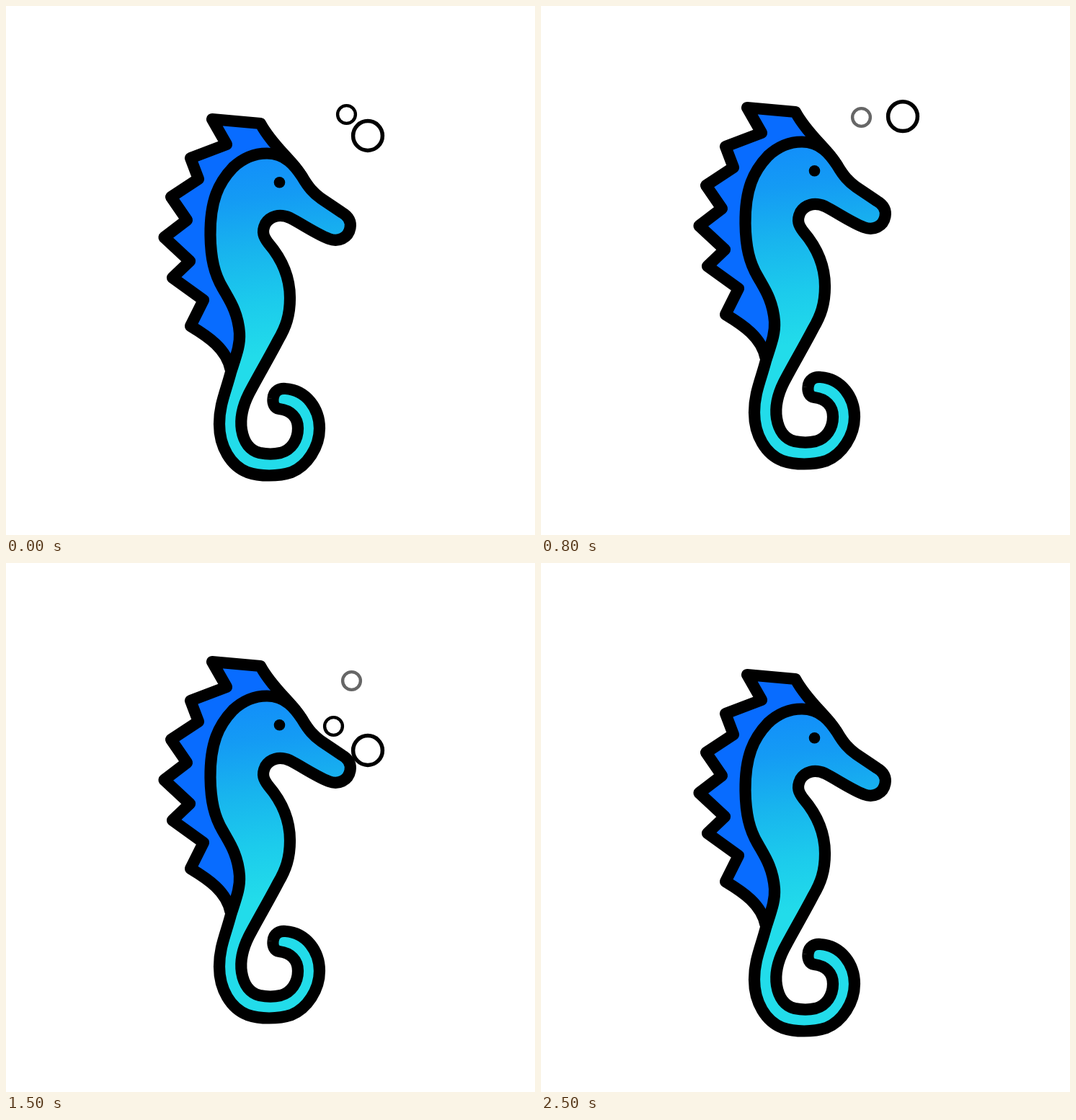
An HTML page with a canvas for the animation above (2.6 s loop, 734 by 734 pixels).

```html
<!DOCTYPE html>
<html lang="en">
<head>
<meta charset="utf-8">
<title>Seahorse</title>
<style>
  html, body { margin: 0; width: 100%; height: 100%; overflow: hidden; background: #fff; }
  canvas { display: block; }
</style>
</head>
<body>
<canvas id="stage" width="734" height="734"></canvas>
<script>
const ctx = document.getElementById('stage').getContext('2d');
const SIZE = 734, STEP = 100, STEPS = 26;

const finEdge = `M411 237 C407 231 403 225 398 219.5 C385 204 366 187 353 163
  L286 157 L306 192 L256 211 L267 240 L229 265 L251 297 L219.5 321 L255 354
  L231 377 L274 408 L256 444 C281 459 306 476 311.5 504`;
const fin = new Path2D(finEdge);
// The fill closes underneath the body.
const finFill = new Path2D(finEdge + 'L324 454 L305 390 L288 320 L320 228 L362 208 Z');

const body = new Path2D(`M362 204.5 C388 204.5 401 222 411 237 C420 252 426 259 437 267
  L466 286.5 C476 292 479 300 477.5 308 C475 322 461 328 448 323
  C430 316 410 302 394 294 C379 287.5 366 292 360 302 C354 314 358 321 364 329
  C382 350 394 374 394 405 C394 430 388 446 378 463 C365 488 349 515 337 538
  C327 558 325 575 327 588 C330 606 339 617 352 620 C362 622 372 622 381 620
  C396 616 405 602 405 586 C405 571 395 561 379 559 C372 558 370 551 370.5 545
  C371 534 380 530 388 531 C417 533 435 559 435 586 C435 612 418 638 396 647
  C378 653 352 653 335 647 C312 638 296 612 296 580 C296 553 305 535 312 508
  C320 483 325 470 324 454 C322 425 310 408 301 392 C289 372 284 350 283.5 318
  C283 270 295 245 315 224 C330 210 346 204.5 362 204.5 Z`);

const skin = ctx.createLinearGradient(335, 212, 365, 485);
[[0, '#128ffa'], [0.2, '#149bf4'], [0.46, '#18b4ee'], [0.73, '#1ccbec'], [1, '#22dcea']]
  .forEach(([at, color]) => skin.addColorStop(at, color));

// Vertical drift as [step, offset] pairs.
const drift = [[0, 0], [12, -24], [13, -24], [15, -20], [18, -16], [26, 0]];

// Bubbles drift at `slow` px per step, then rise quickly from step `fast` and fade after `fade`.
const small = { r: 12.4, w: 4.4, slow: 2 };
const big = { r: 20.4, w: 5.5, slow: 2 };
const bubbles = [
  { ...small, x: 472.5, y: 150.5, start: 0, fast: 0, fade: 3 },
  { ...small, x: 444.5, y: 204.5, start: 3, fast: 3, fade: 6 },
  { ...small, x: 479.5, y: 213.5, start: 10, fast: 10, fade: 13 },
  { ...small, x: 454.5, y: 234.5, start: 11, fast: 15, fade: 16 },
  { ...big, x: 502, y: 180, start: 0, fast: 7, fade: 8, slow: 2.4 },
  { ...big, x: 502, y: 262, start: 14, fast: 19, fade: 19 }
];

function offsetAt(n) {
  const i = drift.findIndex(([step]) => step > n);
  const [n0, y0] = drift[i - 1], [n1, y1] = drift[i];
  return y0 + (y1 - y0) * (n - n0) / (n1 - n0);
}

function disc(x, y, r) {
  ctx.beginPath();
  ctx.arc(x, y, r, 0, Math.PI * 2);
}

function outlined(edge, area, fill) {
  ctx.fillStyle = fill;
  ctx.lineWidth = 16.2;
  ctx.fill(area);
  ctx.stroke(edge);
}

function drawSeahorse(dy) {
  ctx.save();
  ctx.translate(0, dy);
  outlined(fin, finFill, '#086cff');
  outlined(body, body, skin);
  ctx.fillStyle = '#000';
  disc(379.5, 244.8, 7.8);
  ctx.fill();
  ctx.restore();
}

function drawBubble(b, n) {
  const alpha = 1 - 0.2 * Math.max(0, n - b.fade);
  if (n < b.start || alpha < 0.01) return;
  const rise = b.slow * (Math.min(n, b.fast) - b.start) + 10 * Math.max(0, n - b.fast);
  ctx.globalAlpha = alpha;
  ctx.lineWidth = b.w;
  disc(b.x, b.y - rise, b.r);
  ctx.stroke();
  ctx.globalAlpha = 1;
}

function draw(time) {
  const n = Math.floor(time / STEP) % STEPS;
  ctx.fillStyle = '#fff';
  ctx.fillRect(0, 0, SIZE, SIZE);
  ctx.strokeStyle = '#000';
  ctx.lineJoin = ctx.lineCap = 'round';
  drawSeahorse(offsetAt(n));
  bubbles.forEach(b => drawBubble(b, n));
}

const began = performance.now();
function tick() {
  draw(performance.now() - began);
  requestAnimationFrame(tick);
}
tick();
</script>
</body>
</html>
```
